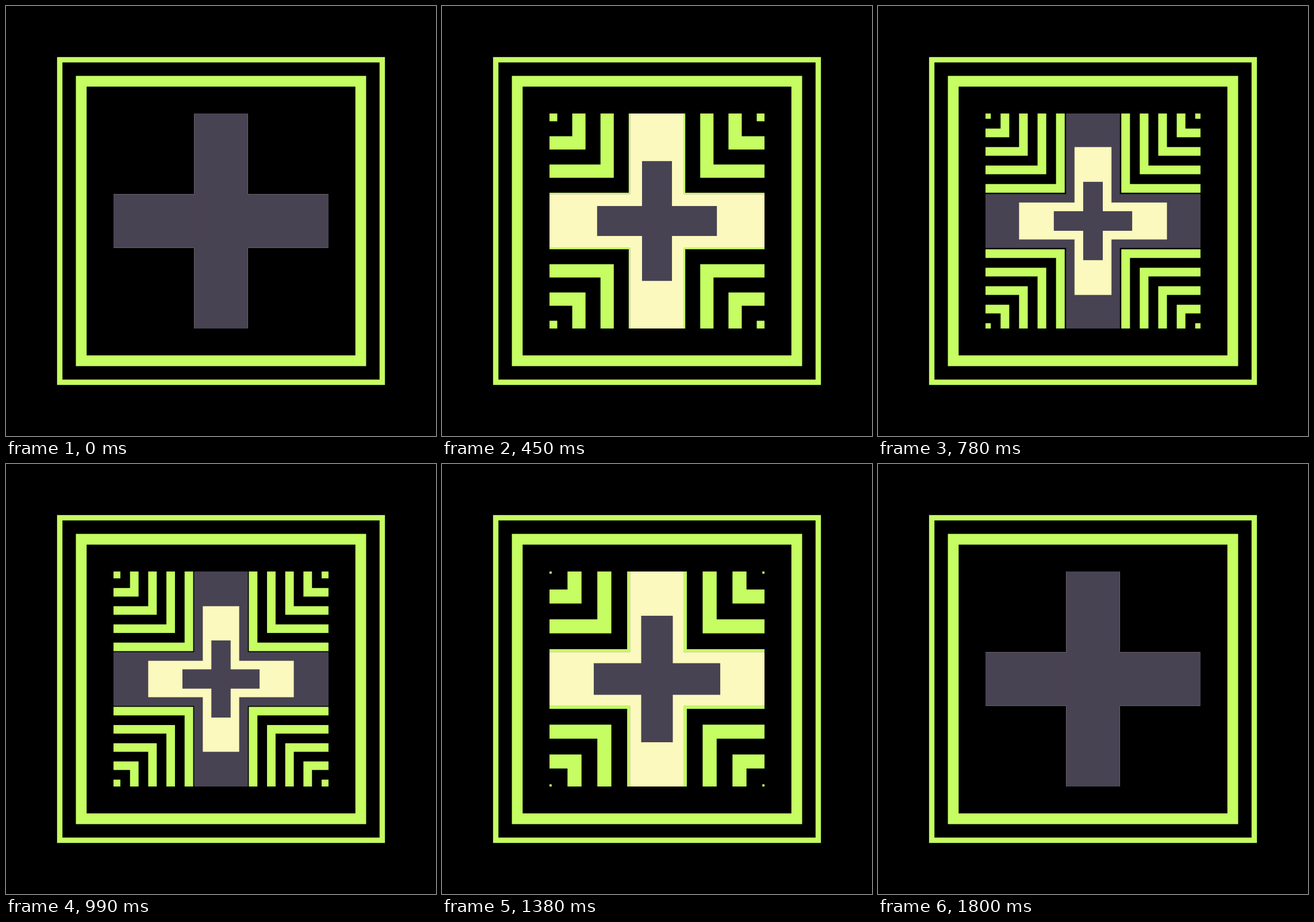
An HTML page with a canvas that plays this animation: 748x748 px, repeating every 2.19 s.

```html
<!DOCTYPE html>
<html>
<head>
<meta charset="utf-8">
<style>
html, body { margin: 0; height: 100%; overflow: hidden; background: #000; }
canvas { display: block; }
</style>
</head>
<body>
<canvas id="stage" width="748" height="748"></canvas>
<script>
const ctx = document.getElementById('stage').getContext('2d');
const GREEN = '#c5fd62', CREAM = '#fbf9bd', SLATE = '#484353', BLACK = '#000';
const LOOP = 2190, MOVE = 1800, STEP = 30;
const HALF = 187, ARM = HALF / 4;
const DARK = 0.53; // dark share of each band period

// Number of bands across the box: swells from 1 to 12 and back.
function bandCount(t) {
  if (t <= 0 || t >= MOVE) return 1;
  const s = Math.cos(Math.PI * (t - 903) / 1810);
  return 1 + 11 * s * (0.42 + s * (0.68 - 0.1 * s));
}

function cross(halfWidth, halfLength, color) {
  const w = Math.min(halfWidth, HALF), l = Math.min(halfLength, HALF);
  ctx.fillStyle = color;
  ctx.fillRect(-l, -w, 2 * l, 2 * w);
  ctx.fillRect(-w, -l, 2 * w, 2 * l);
}

function frame(half, lineWidth) {
  ctx.strokeStyle = GREEN;
  ctx.lineWidth = lineWidth;
  ctx.strokeRect(-half, -half, 2 * half, 2 * half);
}

function centerCross(halfWidth, color) {
  const w = Math.min(halfWidth, ARM);
  cross(w, 4 * w, color);
}

function draw(t) {
  const period = 2 * HALF / bandCount(t);
  ctx.setTransform(1, 0, 0, 1, 374, 374);
  ctx.fillStyle = BLACK;
  ctx.fillRect(-374, -374, 748, 748);
  frame(280.5, 9.35);
  frame(243.1, 18.7);

  for (let k = Math.ceil(HALF / period); k > 0; k--) {
    const inner = (k - 1 + DARK) * period;
    if (inner >= HALF) continue;
    cross(k * period, HALF, GREEN);
    cross(inner, HALF, BLACK);
  }

  centerCross(ARM, SLATE);
  centerCross(period, CREAM);
  centerCross(DARK * period, SLATE);
}

const start = performance.now();
function tick() {
  const t = (performance.now() - start) % LOOP;
  draw(Math.floor(t / STEP) * STEP);
  requestAnimationFrame(tick);
}
tick();
</script>
</body>
</html>
```
